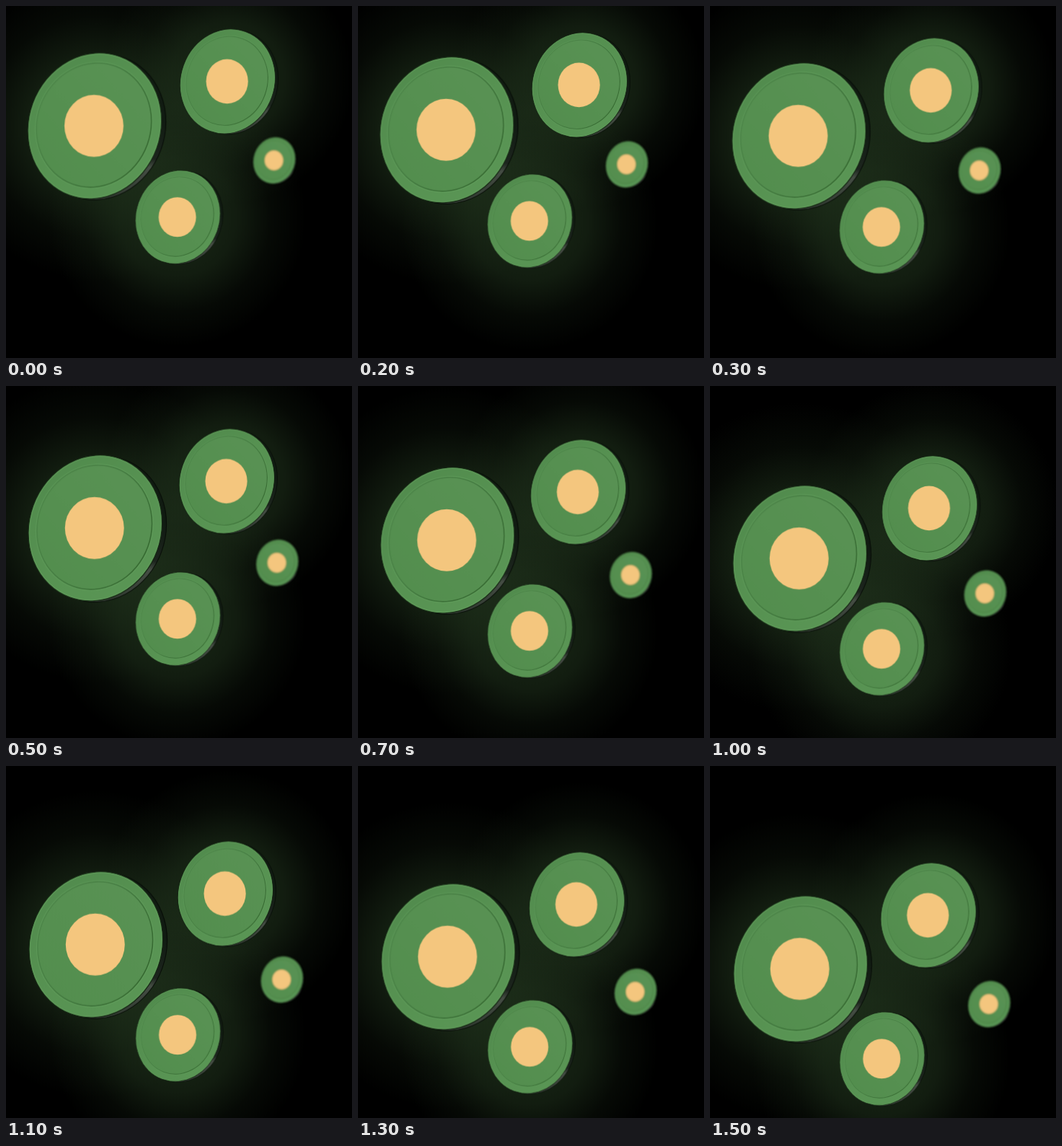
An HTML page for the animation above (1600 ms loop, 480 by 488 pixels).

```html
<!DOCTYPE html>
<html lang="en">
<head>
<meta charset="utf-8">
<title>Falling tokens</title>
<style>
  html, body { margin: 0; width: 100%; height: 100%; overflow: hidden; background: #000; }
  svg { display: block; width: 480px; height: 488px; }

  /* One short hitch at the seam, then an even drift at ten steps a second. */
  .drift { animation: drift 1.6s infinite; }
  @keyframes drift {
    0% {
      transform: translate(calc(var(--dx) * 1.35), calc(var(--dy) * 1.35));
      animation-timing-function: step-end;
    }
    6.25% {
      transform: translate(var(--dx), var(--dy));
      animation-timing-function: steps(15, end);
    }
    100% { transform: translate(calc(var(--dx) * 16), calc(var(--dy) * 16)); }
  }
  #glow  { --dx: 0px;     --dy: 8.1px; }
  #large { --dx: .18px;   --dy: 8.43px; }
  #upper { --dx: -.33px;  --dy: 7.5px; }
  #lower { --dx: .03px;   --dy: 8.3px; }
  #far   { --dx: 1.1px;   --dy: 8.5px; }
</style>
</head>
<body>
<svg viewBox="0 0 480 488">
  <defs>
    <radialGradient id="light">
      <stop offset="0" stop-color="#243920" stop-opacity=".75"/>
      <stop offset=".45" stop-color="#243920" stop-opacity=".5"/>
      <stop offset=".72" stop-color="#243920" stop-opacity=".17"/>
      <stop offset="1" stop-color="#243920" stop-opacity="0"/>
    </radialGradient>
    <linearGradient id="edge" x1=".6" y1="0" x2=".75" y2="1">
      <stop offset=".35" stop-color="#111b12"/>
      <stop offset=".62" stop-color="#1d251e"/>
      <stop offset=".68" stop-color="#454d44"/>
      <stop offset="1" stop-color="#2a332a"/>
    </linearGradient>
    <linearGradient id="rim" x1="0" y1=".2" x2="1" y2=".8">
      <stop offset="0" stop-color="#518b4d"/>
      <stop offset=".5" stop-color="#579252"/>
      <stop offset="1" stop-color="#5a9655"/>
    </linearGradient>
    <linearGradient id="face" x1=".2" y1="1" x2=".7" y2="0">
      <stop offset="0" stop-color="#538e4e"/>
      <stop offset="1" stop-color="#599254"/>
    </linearGradient>
    <linearGradient id="groove" x1="0" y1=".4" x2="1" y2=".6">
      <stop offset="0" stop-color="#3a6f38" stop-opacity=".25"/>
      <stop offset=".45" stop-color="#3a6f38" stop-opacity=".6"/>
      <stop offset="1" stop-color="#34672f"/>
    </linearGradient>
    <filter id="soft" x="-20%" y="-20%" width="140%" height="140%">
      <feGaussianBlur stdDeviation="3.6"/>
    </filter>

    <g id="token">
      <ellipse cx="6" cy="1.5" rx="91.5" ry="102.3" transform="rotate(20 6 1.5)" fill="url(#edge)" stroke="#080d08"/>
      <g transform="rotate(20)">
        <ellipse rx="91.5" ry="102.3" fill="url(#rim)" stroke="#152713" stroke-width="1.3"/>
        <ellipse rx="90" ry="100.8" fill="none" stroke="#69a563" stroke-opacity=".45" stroke-width="1.5"/>
        <ellipse cx="-1.3" cy="-.6" rx="78.8" ry="87" fill="url(#face)" stroke="url(#groove)" stroke-width="1.6"/>
        <ellipse cx="-1.3" cy="-.6" rx="80.4" ry="88.6" fill="none" stroke="#6ba765" stroke-opacity=".35" stroke-width="1.2"/>
      </g>
      <ellipse cx="-1" cy="0" rx="41" ry="43" fill="#f4c67e"/>
    </g>
  </defs>

  <rect width="480" height="488"/>
  <g id="glow" class="drift" fill="url(#light)">
    <circle cx="125" cy="157" r="215"/>
    <circle cx="308" cy="90" r="175"/>
    <circle cx="238" cy="283" r="180"/>
  </g>
  <g id="far" class="drift">
    <use href="#token" transform="translate(370.5 202.5) scale(.312 .317)" filter="url(#soft)"/>
  </g>
  <g id="upper" class="drift">
    <use href="#token" transform="translate(307.9 94.4) scale(.71 .716)"/>
  </g>
  <g id="lower" class="drift">
    <use href="#token" transform="translate(238.3 281.3) scale(.634 .641)"/>
  </g>
  <g id="large" class="drift">
    <use href="#token" transform="translate(122.8 154.8)"/>
  </g>
</svg>
</body>
</html>
```
